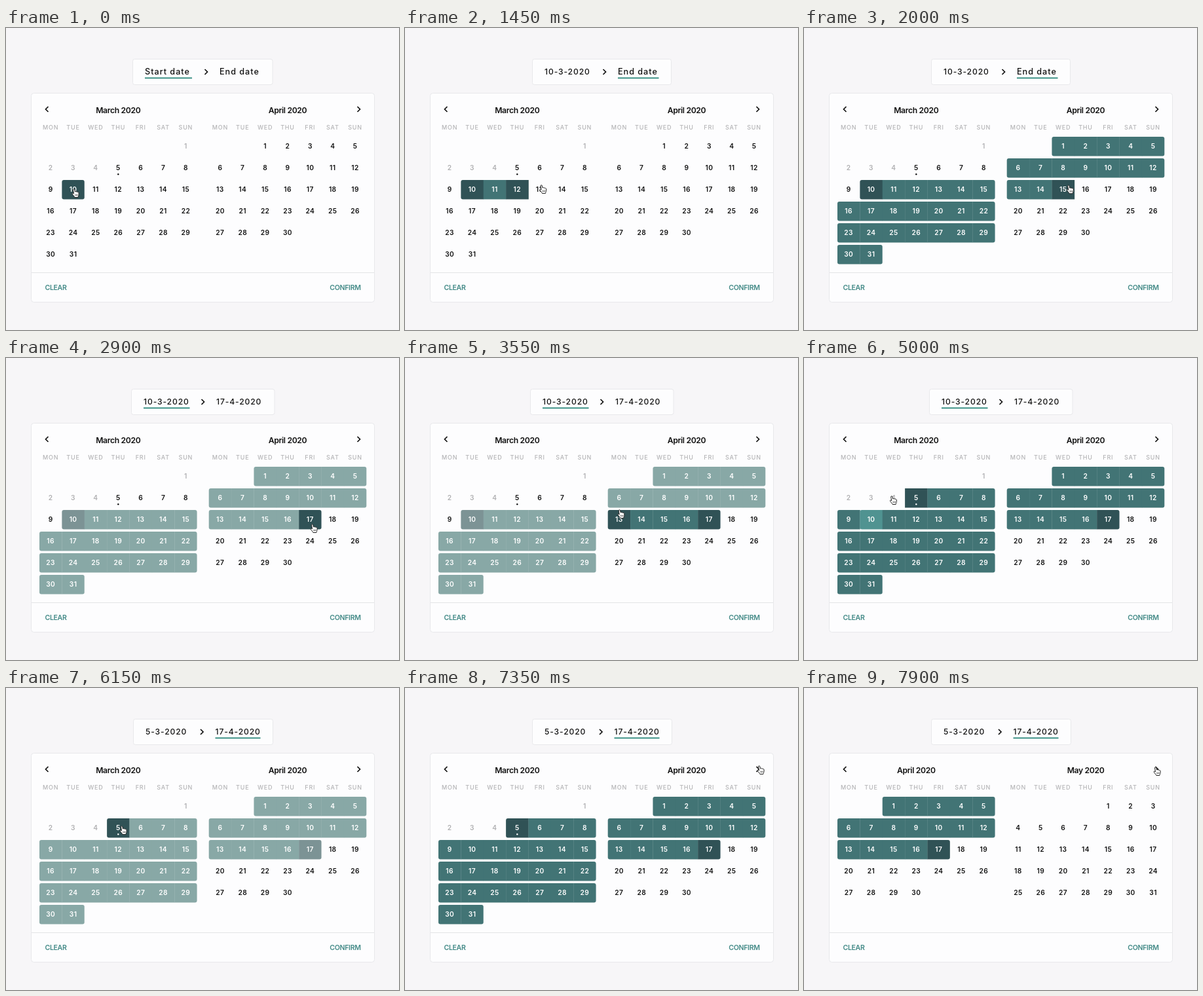
Animation of 600 by 461 pixels, one loop 8 s. Source, as an HTML page:

```html
<!DOCTYPE html>
<html lang="en">
<head>
<meta charset="utf-8">
<title>Date range picker</title>
<style>
  html, body { margin: 0; width: 100%; height: 100%; overflow: hidden; background: #f7f6f8; }
  svg { display: block; width: 100vw; height: 100vh; font-family: Inter, "Open Sans", sans-serif; fill: #111; }
  .card { fill: #fdfdfe; stroke: #e8e8eb; }
  .field { font-size: 12.6px; font-weight: 500; letter-spacing: 1px; }
  .date { font-size: 12.1px; font-weight: 500; letter-spacing: .9px; }
  .title { font-size: 12.2px; font-weight: 600; letter-spacing: -.35px; text-anchor: middle; }
  .week { font-size: 9px; font-weight: 500; letter-spacing: .8px; fill: #b4b4b6; text-anchor: middle; }
  .day { font-size: 10.2px; font-weight: 600; letter-spacing: .4px; text-anchor: middle; }
  .button { font-size: 10.6px; font-weight: 600; letter-spacing: -.35px; fill: #438a87; text-anchor: middle; }
  .line { fill: none; stroke: #111; stroke-width: 1.7; }
  .hand { fill: #fff; stroke: #222; stroke-width: 1; stroke-linejoin: round; }
</style>
</head>
<body>
<svg id="stage" viewBox="0 0 600 461"></svg>
<script>
const LOOP = 8000, CELL = 34.37, ROW = 33, LEFTS = [51, 309.7], TODAY = 5;
const DARK = '#305256', MID = '#427475', LIGHT = '#509391', FADED = '#88a8a6', FADED_END = '#7c9395';

// Days count on from 1 March: "before" is the number of days passed, "col" the weekday of the 1st.
const MONTHS = [
  { name: 'March 2020', before: 0, days: 31, col: 6 },
  { name: 'April 2020', before: 31, days: 30, col: 2 },
  { name: 'May 2020', before: 61, days: 31, col: 4 }
];

// Each phase begins with a click; spans are the left and right edges of the two fields.
const PHASES = [
  { at: 0, start: 10, end: 10, active: 0, text: ['Start date', 'End date'], spans: [[212, 284], [326, 388]] },
  { at: 1050, start: 10, active: 1, text: ['10-3-2020', 'End date'], spans: [[213, 283], [325, 387.5]] },
  { at: 2900, start: 10, end: 48, active: 0, text: ['10-3-2020', '17-4-2020'], spans: [[210, 280.5], [321, 391]] },
  { at: 5400, start: 5, end: 48, active: 1, text: ['5-3-2020', '17-4-2020'], spans: [[213, 278], [319.5, 388.5]] }
];
const NEXT_MONTH = 7700;

// Pointer: time, x, y
const PATH = [
  [0, 106, 252], [1350, 106, 252], [1450, 210, 246], [1800, 345, 243], [2150, 440, 250],
  [2500, 470, 260], [3150, 470, 260], [3550, 330, 238], [3950, 244, 227], [4000, 244, 227],
  [4400, 165, 222], [4800, 108, 217], [4850, 108, 217], [5200, 179, 217], [6750, 179, 217],
  [6950, 400, 180], [7100, 574, 140], [7350, 543, 125], [7650, 543, 125], [7850, 539, 127], [8000, 539, 127]
];

function slope(i, k) {
  const a = PATH[i - 1], b = PATH[i], c = PATH[i + 1];
  const resting = !a || !c || a[1] === b[1] || b[1] === c[1];
  return resting ? 0 : (c[k] - a[k]) / (c[0] - a[0]);
}

function pointer(t) {
  t = Math.max(0, t);
  const i = PATH.findIndex((p, n) => n + 1 < PATH.length && t < PATH[n + 1][0]);
  const a = PATH[i], b = PATH[i + 1], span = b[0] - a[0], u = (t - a[0]) / span;
  return [1, 2].map(k => {
    const h = u * u * (3 - 2 * u);
    return a[k] + (b[k] - a[k]) * h
      + span * u * (1 - u) * ((1 - u) * slope(i, k) - u * slope(i + 1, k));
  });
}

function dayAt(x, y) {
  const side = x < 300 ? 0 : 1, m = MONTHS[side];
  const col = Math.floor((x - LEFTS[side]) / CELL), row = Math.floor((y - 164.5) / ROW);
  const n = row * 7 + col - m.col + 1;
  const valid = col >= 0 && col < 7 && n > 0 && n <= m.days && m.before + n >= TODAY;
  return valid ? m.before + n : 0;
}

// The last selectable day stays hovered until the pointer leaves the grid.
function hovered(t) {
  for (let u = t - 35; ; u -= 25) {
    const [x, y] = pointer(u);
    if (y - 5 < 162) return 0;
    const day = dayAt(x - 2, y - 5);
    if (day) return day;
  }
}

const between = (d, a, b) => d >= Math.min(a, b) && d <= Math.max(a, b);

function cellColor(d, phase, hover) {
  const { start, end = start, active } = phase;
  const [fixed, other] = active ? [start, end] : [end, start];
  const tip = hover || other, inNew = between(d, fixed, tip);
  if (d === tip || d === fixed) return DARK;
  if (d === other) return inNew ? LIGHT : FADED_END;
  if (inNew) return MID;
  return between(d, start, end) ? FADED : '';
}

const text = (cls, x, y, s, fill) =>
  `<text class="${cls}" x="${x}" y="${y}"${fill ? ` style="fill:${fill}"` : ''}>${s}</text>`;
const chevron = (x, y, dir) => `<path class="line" d="M${x - 2 * dir} ${y - 4}l${4 * dir} 4l${-4 * dir} 4"/>`;

function cell(x, y, fill, left, right) {
  const w = CELL + (right ? 0 : .3), h = 29.5, l = left ? 3 : 0, r = right ? 3 : 0;
  return `<path fill="${fill}" d="M${x + l} ${y}H${x + w - r}q${r} 0 ${r} ${r}V${y + h - r}q0 ${r} ${-r} ${r}`
    + `H${x + l}q${-l} 0 ${-l} ${-l}V${y + l}q0 ${-l} ${l} ${-l}z"/>`;
}

function month(m, left, phase, hover) {
  let out = text('title', left + 120.3, 129.5, m.name);
  ['MON', 'TUE', 'WED', 'THU', 'FRI', 'SAT', 'SUN'].forEach((w, i) => {
    out += text('week', left + CELL * (i + .5), 155, w);
  });
  for (let n = 1; n <= m.days; n++) {
    const d = m.before + n, slot = m.col + n - 1, col = slot % 7, row = Math.floor(slot / 7);
    const x = left + col * CELL, y = 166 + row * ROW, mid = x + CELL / 2;
    const fill = cellColor(d, phase, hover);
    const ink = fill ? '#fff' : d < TODAY ? '#b0b0b2' : '#111';
    if (fill) {
      out += cell(x, y, fill, col === 0 || n === 1 || d === phase.start,
        col === 6 || n === m.days || d === phase.end);
    }
    out += text('day', mid, y + 18.4, n, ink);
    if (d === TODAY) out += `<circle cx="${mid}" cy="${y + 24.3}" r="1.2" fill="${ink}"/>`;
  }
  return out;
}

function header({ text: labels, spans, active }) {
  const [[a], [b, end]] = spans, [from, to] = spans[active];
  return `<rect class="card" x="${a - 18.5}" y="47.5" width="${end - a + 37.5}" height="39" rx="3"/>`
    + labels.map((s, i) => text(/\d/.test(s) ? 'date' : 'field', spans[i][0], 71.3, s)).join('')
    + chevron(b - 20.5, 67, 1)
    + `<path d="M${from} 76.3H${to}" stroke="#278579" stroke-width="1.7"/>`;
}

const hand = ([x, y]) => `<g class="hand" transform="translate(${x} ${y})">
  <path d="M-3.5-5c0-1.6 2.2-1.6 2.4 0l.5 3c.6-.8 1.8-.6 2 .2.7-.6 1.8-.4 2 .5.7-.4 1.7 0 1.7 1v2.6c0 2-1 2.2-1.2 4.2h-5c-.4-1.6-2.6-3.2-3.6-5.2-.5-1.2.8-1.8 1.6-.9l.6.7z"/>
  <path d="M-.2 1.8v2.4M1.5 1.8v2.4M3.2 1.8v2.4" stroke-width=".7"/></g>`;

const stage = document.getElementById('stage');

function draw(now) {
  const t = now % LOOP, first = t < NEXT_MONTH ? 0 : 1;
  const phase = PHASES.filter(p => p.at <= t).pop(), hover = hovered(t);
  stage.innerHTML = header(phase)
    + '<rect class="card" x="38.5" y="99.5" width="524" height="319" rx="4"/>'
    + '<path d="M39 373.5H562" stroke="#e3e4e6"/>'
    + chevron(62.5, 124, -1) + chevron(538.5, 124, 1)
    + LEFTS.map((x, i) => month(MONTHS[first + i], x, phase, hover)).join('')
    + text('button', 76, 399.5, 'CLEAR') + text('button', 518, 399.5, 'CONFIRM')
    + hand(pointer(t));
  requestAnimationFrame(draw);
}
requestAnimationFrame(draw);
</script>
</body>
</html>
```
